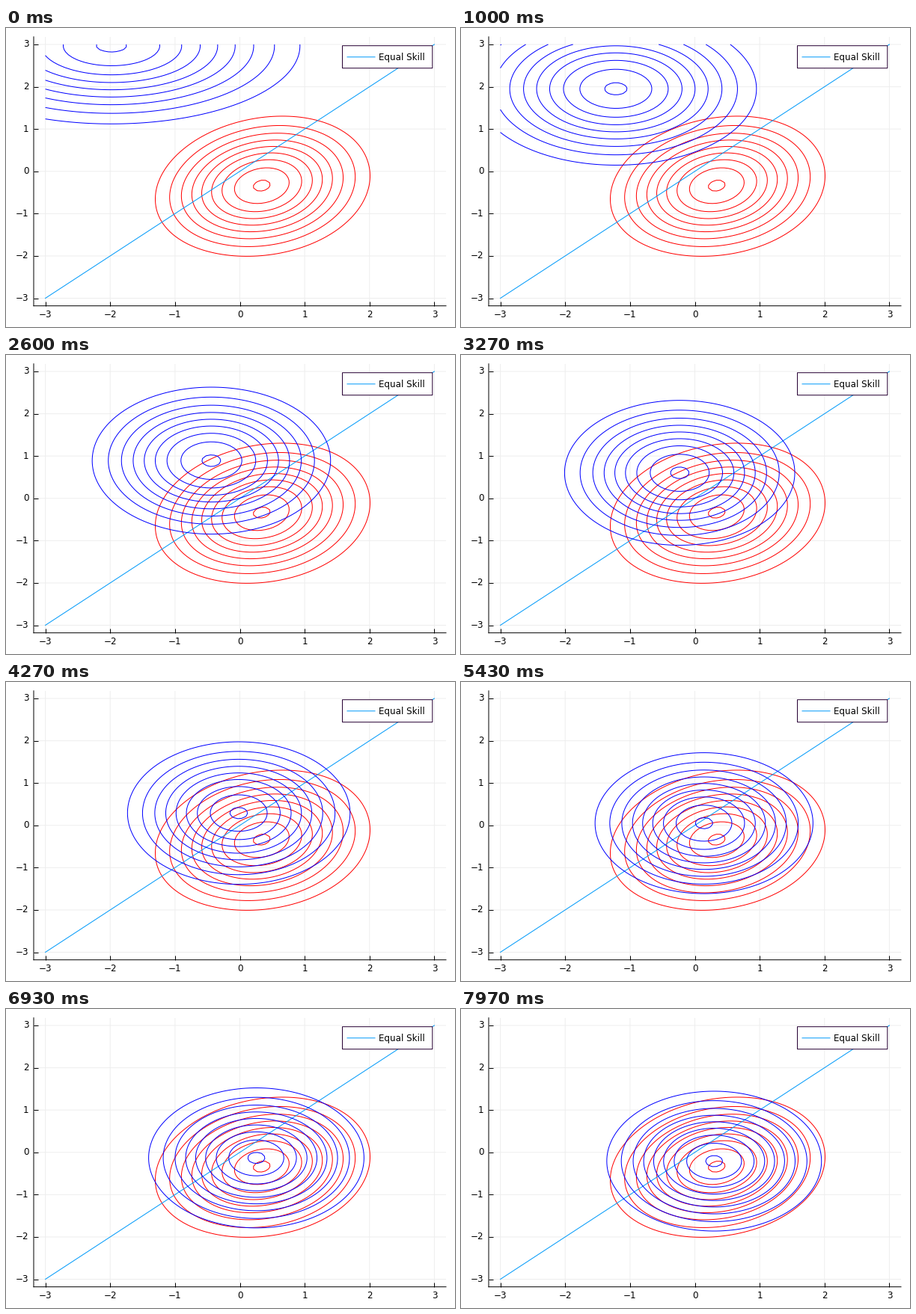
A matplotlib script that plays this animation: 600 px wide and 400 px high, repeating every 8000 ms.

```python
import matplotlib.pyplot as plt
import numpy as np
from matplotlib.animation import FuncAnimation
from matplotlib.patches import Rectangle
from matplotlib.transforms import Affine2D

W, H, DPI = 600, 400, 100
LOOP_MS, INTERVAL = 8000, 25
STEPS = 240  # optimiser steps in one loop
RATE = 0.01  # learning rate
PX = 72 / DPI  # one pixel in points
LEVELS = np.append(np.arange(0.2, 0.95, 0.1), 0.99)
LINE_BLUE = "#009afa"

plt.rcParams.update({"font.family": "DejaVu Sans", "font.size": 8.6,
                     "path.snap": False, "ytick.alignment": "center"})


def sigmoid(v):
    return 1 / (1 + np.exp(-v))


def fit_path(mean, std):
    """Gradient ascent of a diagonal Gaussian towards the posterior."""
    mean, log_std = np.array(mean), np.log(std)
    eps = np.linspace(-5, 5, 201)
    weight = np.exp(-eps**2 / 2)
    weight /= weight.sum()
    path = []
    for _ in range(STEPS):
        var = np.exp(2 * log_std)
        path.append((*mean, *np.exp(log_std)))
        lose = sigmoid(mean[1] - mean[0] + np.sqrt(var.sum()) * eps)
        pull = weight @ lose
        bend = weight @ (lose * (1 - lose))
        mean = mean + RATE * (pull * np.array([1, -1]) - mean)
        log_std = log_std + RATE * (1 - var * (1 + bend))
    return path


path = fit_path(mean=(-1.98, 2.97), std=(1.62, 1.03))

fig = plt.figure(figsize=(W / DPI, H / DPI), dpi=DPI, facecolor="white")
ax = fig.add_axes([37 / W, 28.3 / H, 551 / W, 359.9 / H])
ax.set(xlim=(-3.18, 3.18), ylim=(-3.18, 3.18),
       xticks=range(-3, 4), yticks=range(-3, 4))
ax.set_axisbelow(True)
ax.grid(color="#eeeeee", linewidth=PX)
ax.spines[["top", "right"]].set_visible(False)
ax.spines[["left", "bottom"]].set_linewidth(PX)
ax.tick_params(direction="in", length=4, width=PX)
ax.tick_params(axis="x", pad=3.8)
ax.tick_params(axis="y", pad=4.8)

grid = np.linspace(-3, 3, 100)
gx, gy = np.meshgrid(grid, grid)


def skill_contour(z, color, zorder):
    return ax.contour(gx, gy, z, levels=LEVELS * z.max(), colors=color,
                      linewidths=PX, zorder=zorder)


# Standard normal prior times the logistic chance that x beats y
posterior = np.exp(-(gx**2 + gy**2) / 2) * sigmoid(gx - gy)
skill_contour(posterior, "#ff0000", 2)
ax.plot([-3, 3], [-3, 3], color=LINE_BLUE, linewidth=PX, zorder=3)

# Legend, placed in pixels from the top left
pixels = Affine2D().scale(1 / W, -1 / H).translate(0, 1) + fig.transFigure
fig.add_artist(Rectangle((449.5, 23.7), 120.3, 30, facecolor="white",
                         edgecolor="#260033", linewidth=PX,
                         transform=pixels, zorder=5))
fig.add_artist(plt.Line2D([456, 493], [38.8, 38.8], color=LINE_BLUE,
                          linewidth=PX, transform=pixels, zorder=6))
fig.text(497.5, 43.5, "Equal Skill", transform=pixels, va="baseline", zorder=6)

fitted = []


def draw(n):
    while fitted:
        fitted.pop().remove()
    step = round((n + 0.5) * INTERVAL * STEPS / LOOP_MS)
    mx, my, sx, sy = path[min(step, STEPS - 1)]
    z = np.exp(-((gx - mx) / sx)**2 / 2 - ((gy - my) / sy)**2 / 2)
    fitted.append(skill_contour(z, "#0000ff", 4))
    return fitted


anim = FuncAnimation(fig, draw, frames=LOOP_MS // INTERVAL, interval=INTERVAL,
                     init_func=lambda: draw(0), repeat=True, repeat_delay=0,
                     blit=False)
plt.show()
```
